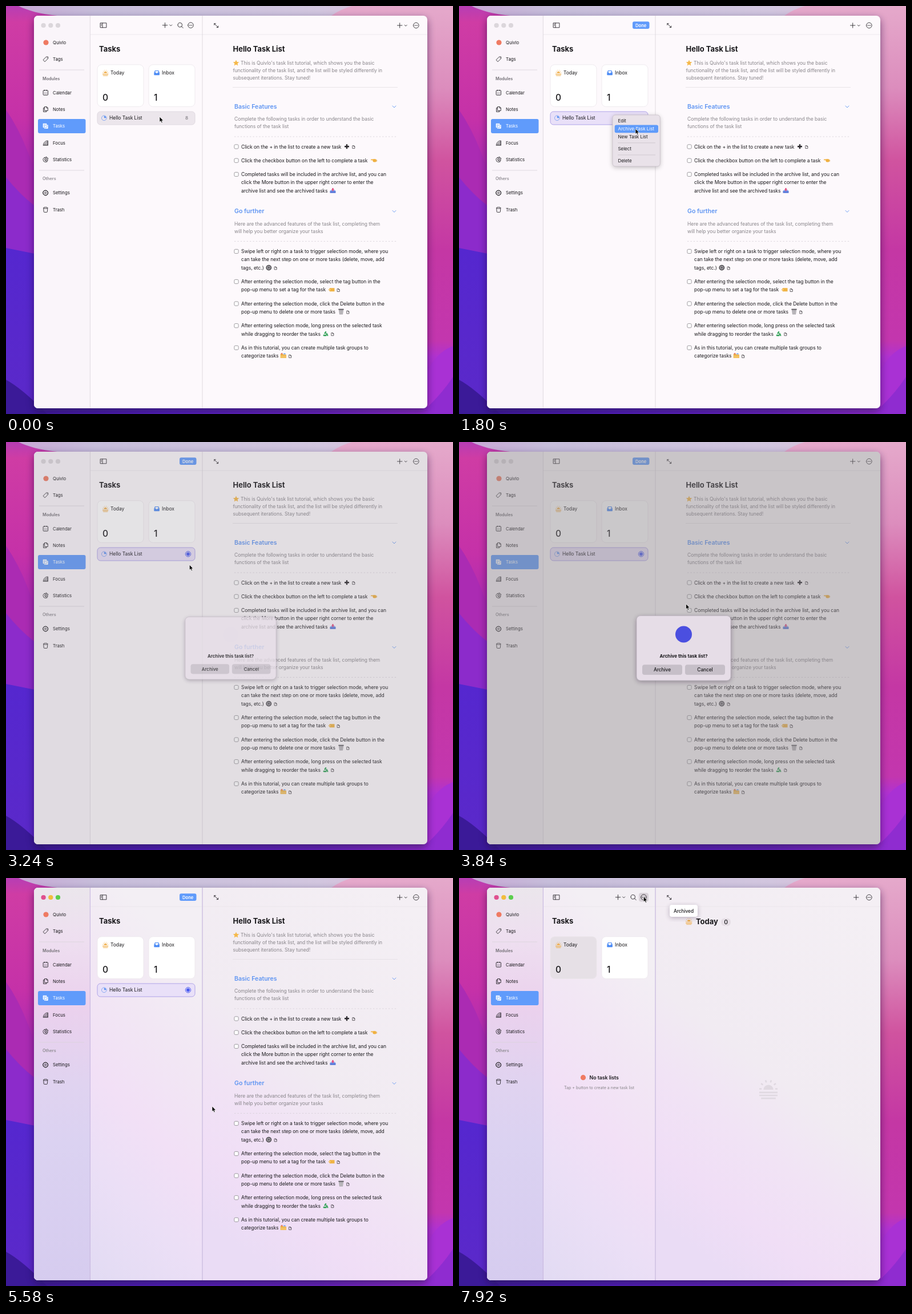
Animation of 783 by 715 pixels, one loop 8 s. Source, as an HTML page:

```html
<!DOCTYPE html>
<html lang="en">
<head>
<meta charset="utf-8">
<title>Task list archive</title>
<style>
html, body { margin: 0; height: 100%; overflow: hidden; background: #c23aa8; }
svg { display: block; width: 783px; height: 715px; }
text { font: 400 8.5px Inter, Roboto, sans-serif; letter-spacing: -.04px; fill: #19181b; }
.h1 { font-size: 13px; font-weight: 700; }
.h2 { font-size: 10.6px; font-weight: 600; fill: #5f95f2; }
.sub { fill: #88858a; }
.nav { font-size: 7.75px; letter-spacing: -.02px; }
.sec { font-size: 7.3px; font-weight: 600; fill: #6f6c72; }
.num { font-size: 15.6px; font-weight: 500; }
.btn { font-size: 8.3px; font-weight: 500; text-anchor: middle; }
.menu { font-size: 8px; }
.ico { fill: none; stroke: #2b292d; stroke-width: .9; stroke-linecap: round; stroke-linejoin: round; }
</style>
</head>
<body>
<svg id="stage" viewBox="0 0 783 715" xmlns="http://www.w3.org/2000/svg"></svg>
<script>
const line = (d, extra = '') => `<path class="ico" d="${d}" ${extra}/>`;
const fill = (d, c) => `<path d="${d}" fill="${c}"/>`;
const rect = (x, y, w, h, r, c, extra = '') => `<rect x="${x}" y="${y}" width="${w}" height="${h}" rx="${r}" fill="${c}" ${extra}/>`;
const dot = (x, y, r, c, extra = '') => `<circle cx="${x}" cy="${y}" r="${r}" fill="${c}" ${extra}/>`;
const text = (x, y, s, cls = '', extra = '') => `<text x="${x}" y="${y}" class="${cls}" ${extra}>${s}</text>`;
const at = (x, y, s) => `<g transform="translate(${x} ${y})">${s}</g>`;
const group = (id, s) => `<g id="${id}">${s}</g>`;
const rule = (x1, x2, y, c = '#e4dfe4', extra = '') => `<path d="M${x1} ${y}H${x2}" stroke="${c}" stroke-width=".8" ${extra}/>`;
const gradient = (id, dir, ...stops) => `<linearGradient id="${id}" ${dir}>` +
  stops.map(([o, c]) => `<stop offset="${o}" stop-color="${c}"/>`).join('') + '</linearGradient>';
const down = 'x1="0" y1="0" x2="0" y2="1"';

// Small icons, each centred on its own zero point
const chevron = (x, y, c = '#2b292d', w = 2) => line(`M${x - w} ${y - w / 2}l${w} ${w}l${w} ${-w}`, `style="stroke:${c}"`);
const plus = (x, y) => line(`M${x - 4.2} ${y}h8.4M${x} ${y - 4.2}v8.4`);
const more = (x, y) => line(`M${x - 4.8} ${y}a4.8 4.8 0 1 0 9.6 0a4.8 4.8 0 1 0-9.6 0`) +
  [-2.2, 0, 2.2].map(d => dot(x + d, y, .75, '#2b292d')).join('');
const rays = (r1, r2) => [0, 36, 72, 108, 144, 180].map(a => {
  const c = Math.cos(a * Math.PI / 180), s = -Math.sin(a * Math.PI / 180);
  return `M${c * r1} ${s * r1}L${c * r2} ${s * r2}`;
}).join('');
const sun = (x, y, k, c) => at(x, y, `<g transform="scale(${k})">` + fill('M-2.7 .5a2.7 2.7 0 0 1 5.4 0z', c) +
  `<path d="${rays(3.7, 5)}M-5 2h10M-5 3.6h10M-4 5.2h8" fill="none" stroke="${c}" stroke-width=".8"/></g>`);
const doc = line('M-1.8-2.4h2.2l1.5 1.5v3.4h-3.7zM.3-2.3v1.5h1.5', 'style="stroke-width:.7"');
const star = fill('M0-5.3L1.6-1.9 5.3-1.5 2.5 1 3.3 4.7 0 2.8-3.3 4.7-2.5 1-5.3-1.5-1.6-1.9z', '#f5b94a');
const emoji = {
  plus: fill('M-1.2-4h2.4v2.8H4v2.4H1.2V4h-2.4V1.2H-4v-2.4h2.8z', '#2c2a2e'),
  hand: rect(-5.5, -2.2, 7, 1.9, .9, '#f2b546') + rect(-2, -2.4, 6.4, 5.3, 2, '#f0b03f') + rect(3.6, -1.2, 2, 3, .5, '#e8c07a'),
  tray: fill('M-5 .5h10v3.6h-10z', '#5576d8') + fill('M-3.6-1.2h7.2l1.4 2h-10z', '#8aa6ea') + fill('M-1.1-4.6h2.2v2.6h1.6L0 .8-2.7-2h1.6z', '#e0487c'),
  radio: dot(0, 0, 4.9, '#4e4c50') + dot(0, 0, 3.3, '#aaa7ac') + dot(0, 0, 2, '#6b696e'),
  tag: fill('M-5.4 0l2.4-3h8.2v6h-8.2z', '#f0b445') + dot(-3, 0, .8, '#fff'),
  bin: fill('M-4-3.6h8l-1 8.4h-6z', '#a9a6ab') + rect(-4.8, -5, 9.6, 1.7, .8, '#5e5c61') +
    `<path d="M-1.6-2.4l.3 6.2M1.6-2.4l-.3 6.2" stroke="#eee" stroke-width=".6"/>`,
  recycle: `<path d="M-3.2 2.8h6.4L0-3.2z" fill="none" stroke="#35a35a" stroke-width="2.4" stroke-dasharray="4.6 1.6" stroke-linejoin="round"/>`,
  folder: fill('M-5-3.6h4l1 1.2h5v6.4h-10z', '#e9ad47') + rect(-4, -4.8, 2.6, 1.6, .3, '#e36a6a') + rect(.4, -4.4, 3.4, 1.6, .3, '#5e9be8') + rect(-5, -.8, 10, 4.8, .6, '#f3c263')
};

const defs = `<defs>
<clipPath id="frame"><rect x="49" y="17" width="689" height="688" rx="7"/></clipPath>
<filter id="soft" x="-20%" y="-20%" width="140%" height="140%"><feGaussianBlur stdDeviation="7"/></filter>
<filter id="near" x="-20%" y="-30%" width="140%" height="160%"><feGaussianBlur stdDeviation="4"/></filter>` +
  gradient('left', down, [0, '#b63eb4'], [.06, '#cf3ca4'], [.42, '#c531a8'], [.6, '#ae2bb2'], [1, '#8a2bd0']) +
  gradient('indigo', down, [0, '#5527cf'], [1, '#5b29c9']) +
  gradient('right', down, [0, '#e5a9cb'], [.2, '#dc8dbd'], [.38, '#d0539f'], [.6, '#c437a4'], [.82, '#c336ae'], [.86, '#b032d0'], [1, '#8c2bcc']) +
  gradient('top', '', [0, '#c7a4d4'], [.2, '#c6bdda'], [.7, '#d2c6df'], [1, '#dfb6d3']) +
  gradient('bottom', '', [0, '#3c1b99'], [.35, '#5321bd'], [.7, '#6a27c2'], [1, '#9a2fd0']) +
  gradient('side', down, [0, '#ebe6ec'], [.13, '#eedff0'], [.3, '#ebd1ed'], [.5, '#e0d3f0'], [.65, '#dbd2f1'], [1, '#d6ccef']) +
  gradient('mid', 'x1=".3" y1="0" x2="0" y2="1"', [0, '#f3eff4'], [.25, '#f2e7f4'], [.5, '#f2e0f6'], [.72, '#ebdff6'], [1, '#e2dbf3']) +
  gradient('main', 'x1=".8" y1="0" x2=".35" y2="1"', [0, '#f4eff4'], [.5, '#f1ebf2'], [.68, '#f1e3f5'], [.85, '#f0def6'], [1, '#eadcf5']) +
  '</defs>';

const wallpaper = rect(0, 0, 783, 715, 0, 'url(#top)') +
  fill('M0 0H22C38 8 60 14 90 17V470H0z', 'url(#left)') +
  fill('M0 182Q30 225 50 290V470H0z', '#ab2bb3') +
  fill('M0 300Q24 330 50 350V470H0z', '#8c2bcb') +
  fill('M0 424L50 434V715H0z', 'url(#indigo)') +
  fill('M783 0H606Q585 6 570 17H700V715H783z', 'url(#right)') +
  rect(0, 700, 783, 15, 0, 'url(#bottom)') +
  fill('M0 655Q28 670 72 715H0z', '#3b1a98') +
  fill('M783 596Q755 606 738 640V715H783z', '#a931d4') +
  fill('M783 650Q760 685 725 715H783z', '#8f2cd0');

const lights = (cs) => cs.map((c, i) => dot(65.6 + i * 12.7, 34, 4.1, c)).join('');
const shell = rect(49, 22, 689, 688, 8, '#1a0838', 'opacity=".55" filter="url(#soft)"') +
  `<g clip-path="url(#frame)">` + rect(49, 17, 689, 688, 0, '#fdf9fc') + rect(49, 17, 98, 688, 0, '#faf5fa') +
  group('sideGlass', rect(49, 17, 98, 688, 0, 'url(#side)')) +
  group('glass', rect(147, 17, 197, 688, 0, 'url(#mid)') + rect(344, 17, 394, 688, 0, 'url(#main)')) +
  rule(147, 738, 50, '#e9e4e9') +
  `<path d="M147.4 17V705M344 17V705" stroke="#dcd6dd" stroke-width=".9"/>` +
  group('edges', `<path d="M147.4 17V705M344 17V705" stroke="#c3b1e3" stroke-width=".9"/>`) + '</g>' +
  lights(['#dbd6db', '#dbd6db', '#dbd6db']) + group('lights', lights(['#e0508f', '#f2bd3d', '#5bce4d']));

const navItems = [
  ['Tags', 93, 'M-4 1.2L1.2-4h3l.2 3L-1 4.4zM2.3-1.9h.2'],
  ['Calendar', 152, 'M-4.2-3.2a1 1 0 0 1 1-1h6.4a1 1 0 0 1 1 1v6.4a1 1 0 0 1-1 1h-6.4a1 1 0 0 1-1-1zM-2-4.8v1.4M2-4.8v1.4M-2-.2h.1M0-.2h.1M2-.2h.1M-2 2h.1M0 2h.1M2 2h.1'],
  ['Notes', 181, 'M-1.5-4.4H2l2 2V2.4h-5.5zM1.8-4.3v2.2h2M-1.5-2.4H-3.8V4.4H1.6V2.4'],
  ['Tasks', 210.5, ''],
  ['Focus', 240, 'M-4 4a8 8 0 0 1 8-8v8M-2 4a6 6 0 0 1 6-6M0 4a4 4 0 0 1 4-4M-4 4h8M2 4a2 2 0 0 1 2-2'],
  ['Statistics', 269, 'M-1-3.8a4.2 4.2 0 1 0 5 5H-1zM1-4.4V-.8H4.5A4 4 0 0 0 1-4.4zM-1 1l3 3'],
  ['Settings', 327.5, 'M-2-4.2h4l2.6 4.2-2.6 4.2h-4L-4.6 0zM-4-2.4L0-4.6 4-2.4V2.4L0 4.6-4 2.4zM-1.6 0a1.6 1.6 0 1 0 3.2 0a1.6 1.6 0 1 0-3.2 0'],
  ['Trash', 357, 'M-3.6-3.2a3.6 1.2 0 1 0 7.2 0a3.6 1.2 0 1 0-7.2 0l.5 6.6q0 1 1 1h4.2q1 0 1-1l.5-6.6']
];
const sidebar = rect(56, 198, 83.5, 25, 3, '#609bfb') + dot(70, 64, 4.6, '#ef7a62') + text(82, 66.8, 'Quivlo', 'nav') +
  navItems.map(([s, y, d]) => at(69.3, y, d ? line(d) :
    rect(-2.6, -2.4, 7, 7, 1, '#fff') + rect(-5, -5, 7.4, 8, 1.4, '#fff', 'stroke="#609bfb" stroke-width=".7"') +
    `<path d="M-3.4-2.6h4M-3.4-.8h4M-3.4 1h2.6" stroke="#609bfb" stroke-width=".7"/>`) +
    text(82, y + 2.8, s, 'nav', d ? '' : 'style="fill:#fff"')).join('') +
  text(64, 129.6, 'Modules', 'sec') + text(64, 305.4, 'Others', 'sec', 'style="fill:#8f8c92"') +
  rule(58, 137, 112, '#d9d2da') + rule(58, 137, 288, '#d9d2da');

const card = (x, id) => rect(x, 102.8, 81, 73.6, 7.5, '#fff', `id="${id}" stroke="#ebe6eb" stroke-width=".8"`);
const lists = line('M165.5 29.8h10.4v8h-10.4zM169 29.8v8M166.8 32h.8M166.8 34h.8') + text(163, 80.2, 'Tasks', 'h1') +
  card(160, 'today') + card(250, 'inbox') + sun(174.2, 117, 1, '#efab45') + text(183, 120, 'Today') +
  fill('M259.3 117l1.6-4h6.4l1.6 4v3.4q0 .8-.8.8h-8q-.8 0-.8-.8zM261 116.6h1.8q.2 1.4 1.3 1.4t1.3-1.4h1.8l-1-2.6h-4.2z', '#4f8df5') +
  text(273, 120, 'Inbox') + text(169, 165.6, '0', 'num') + text(259, 165.6, '1', 'num') +
  group('row', rect(160, 185, 171, 23, 5.5, '#ece6ec', 'id="rowBox" stroke-width=".9"') +
    dot(171.8, 196.3, 4.3, 'none', 'stroke="#7fa4f0" stroke-width=".9"') + fill('M171.8 196.3v-3.6a3.6 3.6 0 0 1 3.6 3.6z', '#5f95f2') +
    text(181, 199.3, 'Hello Task List') + text(314, 199.2, '8', 'sub', 'id="count" style="font-weight:600;font-size:8px"') +
    group('picked', dot(319, 196.3, 4.7, 'none', 'stroke="#4a5cf0" stroke-width="1"') + dot(319, 196.3, 3.1, '#4a5cf0'))) +
  group('tools', rect(315, 26, 17, 15.5, 4, '#d9d2d9', 'id="hover"') + plus(278.5, 33.7) + chevron(288.7, 33.9) +
    line('M301 33.2a3.8 3.8 0 1 0 7.6 0a3.8 3.8 0 1 0-7.6 0M307.6 36l2.6 2.6') + more(323.5, 33.7)) +
  group('done', rect(304, 27.3, 29.5, 12.8, 3, '#609bfb') + text(318.7, 36.6, 'Done', 'btn', 'style="fill:#fff;font-size:7.7px;font-weight:600"'));

const heading = (y, title, ...subs) => text(400, y + 3.7, title, 'h2') + chevron(680, y + .5, '#5f95f2', 3) +
  subs.map((s, i) => text(400, y + 25.2 + i * 13.2, s, 'sub')).join('') + rule(400, 686, y + 53, '#d5cfd6', 'stroke-dasharray="2.4 3"');
const task = (y, rows, icon, x, note) => rect(399.9, y - 3.6, 7.2, 7.2, 1.8, '#fff', 'stroke="#87848a" stroke-width=".8"') +
  rows.map((s, i) => text(412, y + 3 + i * 14.4, s)).join('') +
  at(x, y + (rows.length - 1) * 14.4 - .2, emoji[icon] + (note ? at(12, .8, doc) : ''));
const page = text(397.5, 80.4, 'Hello Task List', 'h1') + at(403, 99.8, star) +
  text(411, 102.8, 'This is Quivlo\'s task list tutorial, which shows you the basic', 'sub') +
  text(397.5, 116.2, 'functionality of the task list, and the list will be styled differently in', 'sub') +
  text(397.5, 129.3, 'subsequent iterations. Stay tuned!', 'sub') + rule(397, 686, 142.5) +
  heading(176, 'Basic Features', 'Complete the following tasks in order to understand the basic', 'functions of the task list') +
  task(246.5, ['Click on the + in the list to create a new task'], 'plus', 597, 1) +
  task(270.8, ['Click the checkbox button on the left to complete a task'], 'hand', 644.5) +
  task(295, ['Completed tasks will be included in the archive list, and you can', 'click the More button in the upper right corner to enter the', 'archive list and see the archived tasks'], 'tray', 572.5) +
  heading(359.4, 'Go further', 'Here are the advanced features of the task list, completing them', 'will help you better organize your tasks') +
  task(430, ['Swipe left or right on a task to trigger selection mode, where you', 'can take the next step on one or more tasks (delete, move, add', 'tags, etc.)'], 'radio', 460.3, 1) +
  task(483, ['After entering the selection mode, select the tag button in the', 'pop-up menu to set a tag for the task'], 'tag', 570.3, 1) +
  task(521.6, ['After entering the selection mode, click the Delete button in the', 'pop-up menu to delete one or more tasks'], 'bin', 587, 1) +
  task(560.2, ['After entering selection mode, long press on the selected task', 'while dragging to reorder the tasks'], 'recycle', 560, 1) +
  task(598.9, ['As in this tutorial, you can create multiple task groups to', 'categorize tasks'], 'folder', 485.8, 1) +
  plus(689.7, 34) + chevron(700.3, 34.2);
const empty = sun(402.7, 75.6, 1.1, '#efab45') + text(415, 81.4, 'Today', 'h1') + rect(459, 70.4, 17, 13.6, 6, '#e6dfe6') +
  text(467.5, 81, '0', 'btn', 'style="font-size:10.5px"') + plus(695.7, 34) + sun(542, 369.5, 3.2, '#e0d9e1') +
  dot(217.5, 349.7, 4.6, '#ef7a62') + text(228.5, 353, 'No task lists', '', 'style="font-size:8.8px;font-weight:600"') +
  text(245.5, 370.2, 'Tap + button to create a new task list', 'sub', 'text-anchor="middle" style="font-size:7.15px"');

const menuRows = [['Edit', 201.5], ['Archive Task List', 215.4], ['New Task List', 229.4], ['Select', 250.5], ['Delete', 271.3]];
const menu = rect(269, 193, 83, 90, 5, '#000', 'opacity=".25" filter="url(#near)"') +
  rect(269, 191, 83.3, 90, 5, '#e9e2e9', 'stroke="#c4bcc5" stroke-width=".7"') + rect(272.7, 0, 76.3, 13.6, 3, '#5f9bfa', 'id="pick"') +
  menuRows.map(([s, y]) => text(278.5, y + 2.9, s, 'menu')).join('') + rule(278, 344, 239.8, '#cac2cb') + rule(278, 344, 261, '#cac2cb');

const dialog = rect(311, 307, 165, 113, 7, '#1c1022', 'opacity=".35" filter="url(#near)"') +
  rect(311, 304.5, 165, 113.5, 7, '#e6dde7', 'stroke="#b9b0bc" stroke-width=".7"') + dot(393.5, 337, 14.5, '#4b4fe0', 'id="badge"') +
  text(393.5, 378.4, 'Archive this task list?', 'btn', 'style="font-weight:700;font-size:8.15px"') +
  rect(321, 390.3, 70, 17.8, 4, '#c6bfc8', 'id="press"') + rect(396, 390.3, 70, 17.8, 4, '#c6bfc8') +
  text(356, 402.2, 'Archive', 'btn') + text(431, 402.2, 'Cancel', 'btn');

const toast = rect(369, 49, 49, 21, 4, '#3a2145', 'opacity=".3" filter="url(#near)"') + rect(369, 47, 49, 21, 4, '#fff') +
  text(393.5, 60.5, 'Archived', 'btn');
const pointer = `<path d="M0 0V9.3L2.1 7.5 3.6 10.8 5.2 10.1 3.8 6.9H6.6z" fill="#000" stroke="#fff" stroke-width=".7"/>`;

stage.innerHTML = defs + wallpaper + shell + sidebar + lists +
  line('M364.8 30.8l6.8 6.8M364.8 33.4v-2.6h2.6M371.6 35v2.6H369') + more(718.3, 34) +
  group('page', page) + group('empty', empty) + group('menu', menu) +
  rect(49, 17, 689, 688, 7, '#8a868b', 'id="dim"') + group('dialog', dialog) + group('toast', toast) + group('cursor', pointer);

const $ = id => document.getElementById(id);
const show = (id, v) => $(id).setAttribute('opacity', v);
const ramp = (t, a, b) => Math.min(1, Math.max(0, (t - a) / (b - a)));
const ease = u => u * u * (3 - 2 * u);
const path = [[0, 269, 194], [1000, 269, 194], [1650, 309, 215], [2600, 309, 215], [2950, 321.3, 215], [3420, 321.3, 215],
  [3840, 397.6, 283.7], [4600, 361, 400], [6780, 361, 400], [7680, 323.3, 32.5], [8000, 323.3, 32.5]];

function cursorAt(t) {
  const i = path.findIndex(p => p[0] > t);
  const [a, b] = [path[i - 1], path[i]], u = ease(ramp(t, a[0], b[0]));
  return [a[1] + (b[1] - a[1]) * u, a[2] + (b[2] - a[2]) * u];
}

function draw(now) {
  const t = now % 8000, [x, y] = cursorAt(t);
  const selecting = ramp(t, 840, 900) - ramp(t, 5800, 5960);
  const gone = ramp(t, 5800, 6040);
  show('sideGlass', ramp(t, 4860, 5100));
  for (const id of ['glass', 'edges']) show(id, ramp(t, 5040, 5400));
  show('lights', ramp(t, 4860, 5040));
  show('page', 1 - gone);
  show('row', 1 - gone);
  show('empty', gone);
  show('tools', 1 - selecting);
  show('done', selecting);
  show('picked', selecting);
  show('count', t < 840 ? 1 : 0);
  $('rowBox').setAttribute('fill', t < 840 ? '#ece6ec' : '#e9e0f8');
  $('rowBox').setAttribute('stroke', t < 840 ? '#ddd6de' : '#a79be6');
  $('today').setAttribute('fill', gone > .5 ? '#e6e0e6' : '#fff');
  show('hover', x > 314 && x < 333 && y > 25 && y < 42 ? 1 : 0);

  show('menu', ramp(t, 840, 900) - ramp(t, 2520, 2700));
  const row = x > 272 ? menuRows.findIndex(r => Math.abs(r[1] - y) < 7) : -1;
  show('pick', row < 0 ? 0 : 1);
  if (row >= 0) $('pick').setAttribute('y', menuRows[row][1] - 6.8);
  document.querySelectorAll('.menu').forEach((e, i) => e.style.fill = i === row ? '#fff' : '');

  const open = ease(ramp(t, 3080, 3400)) - ease(ramp(t, 4960, 5240));
  show('dialog', Math.min(1, open * 1.55));
  $('dialog').setAttribute('transform', `translate(393.5 361) scale(${.93 + .07 * open}) translate(-393.5 -361)`);
  show('badge', ramp(t, 3240, 3420));
  $('press').setAttribute('fill', t > 4860 ? '#b3abb6' : '#c6bfc8');
  show('dim', .45 * (ease(ramp(t, 3080, 3400)) - ease(ramp(t, 4960, 5420))));

  const drop = ease(ramp(t, 5900, 6240));
  show('toast', drop);
  $('toast').setAttribute('transform', `translate(0 ${-26 * (1 - drop)})`);
  $('cursor').setAttribute('transform', `translate(${x} ${y})`);
}

const start = performance.now();
function tick() {
  draw(performance.now() - start);
  requestAnimationFrame(tick);
}
tick();
</script>
</body>
</html>
```
